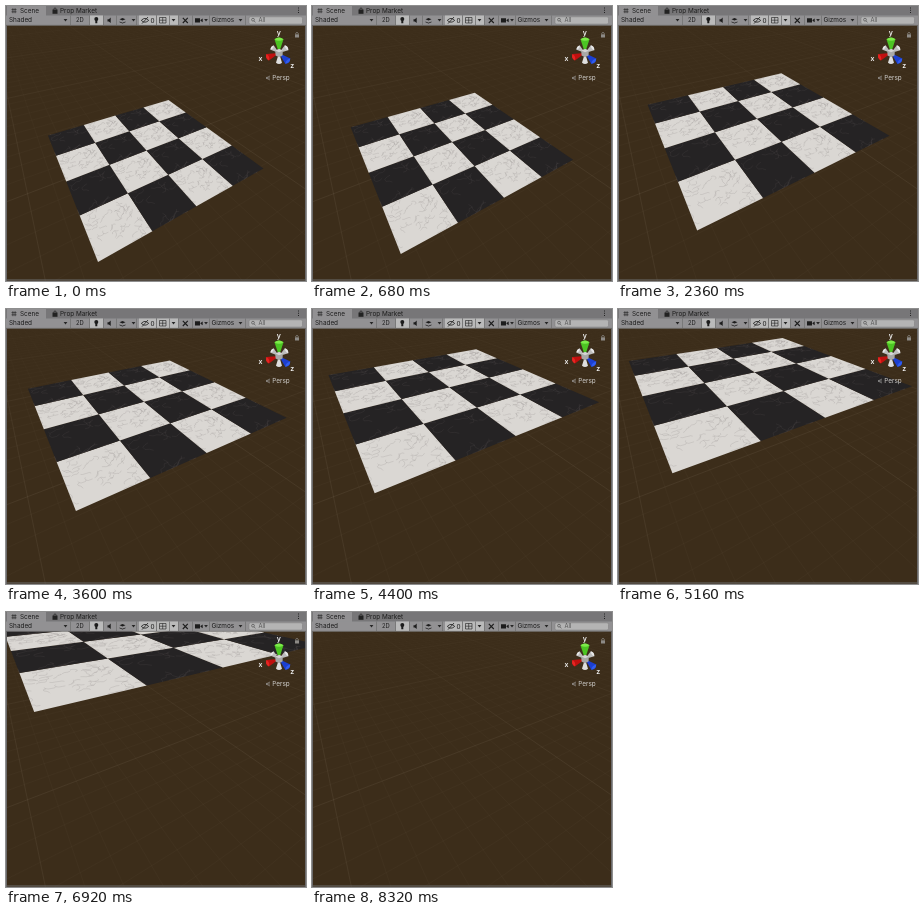
These frames come from a looping animation (300 by 275 pixels, 8.4 s). An HTML page with a canvas:

```html
<!DOCTYPE html>
<html lang="en">
<head>
<meta charset="utf-8">
<title>Scene view</title>
<style>
  html, body { margin: 0; width: 100%; height: 100%; overflow: hidden; background: #3c2d1a; }
  canvas, svg { position: absolute; left: 0; top: 0; width: 300px; height: 275px; }
  text { font: 6.4px Inter, Roboto, sans-serif; fill: #1c1c1c; }
  .small { font-size: 5.8px; }
  .axis { font-size: 7px; font-weight: 600; fill: #f0f0f0; }
</style>
</head>
<body>
<canvas id="ground" width="300" height="275"></canvas>
<canvas id="board" width="300" height="275"></canvas>
<svg viewBox="0 0 300 275">
  <defs>
    <path id="arrow" d="M-1.9-1.2H1.9L0 1.4Z" fill="#262626"/>
    <path id="cone" d="M0 0L-4.3-11.5Q0-14.5 4.3-11.5Z"/>
    <path id="cap" d="M-4.3-11.5Q0-14.5 4.3-11.5Q0-9 -4.3-11.5Z"/>
  </defs>

  <!-- tabs -->
  <rect width="300" height="10" fill="#777678"/>
  <rect x="1" width="39" height="10" fill="#929193"/>
  <path d="M6.9 2.2V7.2M9.1 2.2V7.2M5.5 3.6H10.5M5.5 5.8H10.5" stroke="#2a2a2a" stroke-width=".7"/>
  <text x="14" y="6.9">Scene</text>
  <path d="M46.5 3.5H51.5V7.8H46.5Z" fill="#222"/>
  <path d="M47.6 3.5Q49 0 50.4 3.5" fill="none" stroke="#222" stroke-width=".8"/>
  <text x="54" y="6.9">Prop Market</text>
  <path d="M292 1.6h1v1h-1zM292 3.8h1v1h-1zM292 6h1v1h-1z" fill="#222"/>

  <!-- toolbar -->
  <rect y="9.5" width="300" height="10" fill="#929193"/>
  <path d="M84 9.5H97V19H84ZM133 9.5H150V19H133ZM151 9.5H172V19H151Z" fill="#bababa"/>
  <path d="M64.5 9.5V19M83.5 9.5V19M97.5 9.5V19M110.5 9.5V19M130.5 9.5V19M150.5 9.5V19M163.5 9.5V19M172.5 9.5V19M186.5 9.5V19M203.5 9.5V19M239.5 9.5V19"
        stroke="#737373" stroke-width=".8"/>
  <path d="M0 19.3H300" stroke="#6a6865" stroke-width=".6"/>
  <text x="3" y="16.4">Shaded</text>
  <text class="small" x="70" y="16.4">2D</text>
  <use href="#arrow" x="59.5" y="14.2"/>
  <g fill="#1c1c1c">
    <circle cx="90.3" cy="13" r="2"/>
    <path d="M89.3 14H91.3V17.2H89.3ZM101.5 13.2h1.4l1.8-1.6v5.4l-1.8-1.6H101.5Z"/>
    <path d="M113.5 13.2l3-1.3 3 1.3-3 1.3ZM113.5 15.4l3 1.4 3-1.4v.9l-3 1.3-3-1.3Z"/>
    <path d="M189 12.2h5v4.3h-5ZM194.5 14l2.2-1.4v3.6l-2.2-1.4Z"/>
  </g>
  <g fill="none" stroke="#1c1c1c" stroke-width=".8">
    <path d="M135.3 14.4Q139 10.4 142.7 14.4Q139 18 135.3 14.4ZM136 17.6L142 11"/>
    <path d="M153.5 11.5H160V17H153.5ZM153.5 14.2H160M156.7 11.5V17" stroke-width=".6"/>
    <path d="M176.8 11.9L181.8 17M181.8 11.9L176.8 17" stroke-width="1.1"/>
  </g>
  <text x="144.5" y="16.6">0</text>
  <use href="#arrow" x="127.5" y="14.2"/>
  <use href="#arrow" x="167.5" y="14.2"/>
  <use href="#arrow" x="200" y="14.2"/>
  <text x="205.5" y="16.4">Gizmos</text>
  <use href="#arrow" x="234.5" y="14.2"/>
  <rect x="243" y="10.8" width="53.5" height="7.2" rx="1.5" fill="#b4b4b4" stroke="#7c7c7c" stroke-width=".5"/>
  <g fill="none" stroke="#444" stroke-width=".6"><circle cx="247" cy="13.7" r="1.4"/><path d="M248 14.8l1.4 1.6"/></g>
  <text class="small" x="252.5" y="16.3" style="fill:#555">All</text>

  <!-- orientation gizmo -->
  <g transform="translate(273 47)">
    <g fill="#bdbdbd">
      <use href="#cone" transform="rotate(-52) scale(.62 .75)"/>
      <use href="#cone" transform="rotate(55) scale(.7 .8)"/>
    </g>
    <g fill="#e8e8e8">
      <use href="#cap" transform="rotate(-52) scale(.62 .75)"/>
      <use href="#cap" transform="rotate(55) scale(.7 .8)"/>
    </g>
    <use href="#cone" transform="rotate(180) scale(.7 .85)" fill="#dedede"/>
    <use href="#cone" transform="rotate(-111) scale(.82 1.05)" fill="#c0100f"/>
    <use href="#cap" transform="rotate(-111) scale(.82 1.05)" fill="#e62522"/>
    <use href="#cone" transform="rotate(133) scale(.85 1.04)" fill="#1c3fd0"/>
    <use href="#cap" transform="rotate(133) scale(.85 1.04)" fill="#2f5cf0"/>
    <use href="#cone" transform="scale(1.05 1.2)" fill="#4cc423"/>
    <use href="#cap" transform="scale(1.05 1.2)" fill="#7dea4a"/>
    <path d="M-3.8-2.5L.3-4 3.8-2.2 3.5 2.5 0 4.2-3.4 2.4Z" fill="#a8a8a8"/>
    <path d="M-3.8-2.5L.3-4 3.8-2.2 0-.8Z" fill="#d4d4d4"/>
  </g>
  <text class="axis" x="270.7" y="28.8">y</text>
  <text class="axis" x="252.5" y="55">x</text>
  <text class="axis" x="284.2" y="62">z</text>
  <path d="M289 28.3h4v3.2h-4Z" fill="#8d8a86"/>
  <path d="M289.8 28.3v-1.3q1.2-1.5 2.4 0v1.3" fill="none" stroke="#8d8a86" stroke-width=".7"/>
  <path d="M264 70L260 72L264 74M264 72H260" fill="none" stroke="#aaa" stroke-width=".6"/>
  <text x="266.3" y="74.3" style="fill:#cfcdca">Persp</text>

  <!-- window edges -->
  <path d="M.5 19V275M299.5 19V275M0 274H300" stroke="#6b6a6b"/>
</svg>
<script>
const LOOP = 8400, STEP = 40, GONE = 8320;

// Homogeneous screen vectors: near corner plus the two board edges,
// measured from the vanishing point of the vertical axis.
const VP = [153, 405];
const NEAR = [-825, -2016, 13.53], U = [2899, -2799, 6.32], V = [-1790, -4474, 10.02];

// Point (a, b) of the board plane after rising for s seconds.
function project(a, b, s) {
  const [x, y, w] = NEAR.map((n, i) => n + a * U[i] + b * V[i]);
  return [VP[0] + x / (w - s), VP[1] + y / (w - s)];
}

function trace(ctx, points, s) {
  points.forEach(([a, b], i) => {
    const p = project(a, b, s);
    if (i) ctx.lineTo(...p); else ctx.moveTo(...p);
  });
}

function randomizer(seed) {
  return () => (seed = (seed * 16807) % 2147483647) / 2147483647;
}

function drawGround(ctx) {
  ctx.fillStyle = "#3c2d1a";
  ctx.fillRect(0, 0, 300, 275);
  const fade = alpha => {
    const g = ctx.createLinearGradient(0, 20, 0, 275);
    g.addColorStop(0, `rgba(190,175,155,${alpha * 0.3})`);
    g.addColorStop(0.45, `rgba(190,175,155,${alpha})`);
    g.addColorStop(1, `rgba(190,175,155,${alpha})`);
    return g;
  };
  const minor = fade(0.04), major = fade(0.11);
  ctx.lineWidth = 0.8;
  for (let k = -30; k <= 40; k++) {
    ctx.strokeStyle = k % 10 ? minor : major;
    const a = 1.06 + k / 8, b = 0.52 + k / 8;
    const fromB = (1 - NEAR[2] - a * U[2]) / V[2];
    const fromA = (1 - NEAR[2] - b * V[2]) / U[2];
    ctx.beginPath();
    trace(ctx, [[a, fromB], [a, fromB + 9]], 0);
    trace(ctx, [[fromA, b], [fromA + 12, b]], 0);
    ctx.stroke();
  }
}

// Wandering marble veins inside a unit tile.
function makeVeins(seed, count, length) {
  const rnd = randomizer(seed), clamp = n => Math.min(1, Math.max(0, n));
  return Array.from({ length: count }, () => {
    let x = rnd(), y = rnd(), angle = rnd() * 6.28;
    return Array.from({ length: 6 }, () => {
      angle += (rnd() - 0.5) * 2.4;
      x = clamp(x + Math.cos(angle) * length);
      y = clamp(y + Math.sin(angle) * length);
      return [x, y];
    });
  });
}

const marbles = [
  { fill: "#dad7d3", vein: "rgba(120,115,110,.16)", veins: makeVeins(71, 60, 0.03) },
  { fill: "#252324", vein: "rgba(160,158,158,.08)", veins: makeVeins(313, 18, 0.07) }
];

function drawBoard(ctx, s) {
  ctx.clearRect(0, 0, 300, 275);
  for (let i = 0; i < 4; i++) for (let j = 0; j < 4; j++) {
    const { fill, vein, veins } = marbles[(i + j) % 2];
    const place = points => points.map(([x, y]) => [(i + x) / 4, (j + y) / 4]);
    ctx.beginPath();
    trace(ctx, place([[0, 0], [1, 0], [1, 1], [0, 1]]), s);
    ctx.closePath();
    ctx.fillStyle = fill;
    ctx.fill();
    ctx.beginPath();
    veins.forEach(v => trace(ctx, place(v), s));
    ctx.strokeStyle = vein;
    ctx.lineWidth = 1;
    ctx.stroke();
  }
}

drawGround(document.getElementById("ground").getContext("2d"));
const boardCtx = document.getElementById("board").getContext("2d");
const start = performance.now();
let shown = -1;

function tick() {
  const t = (performance.now() - start) % LOOP;
  const step = Math.min(GONE, Math.floor(t / STEP) * STEP);
  if (step !== shown) {
    shown = step;
    if (step < GONE) drawBoard(boardCtx, step / 1000);
    else boardCtx.clearRect(0, 0, 300, 275);
  }
  requestAnimationFrame(tick);
}
tick();
</script>
</body>
</html>
```
